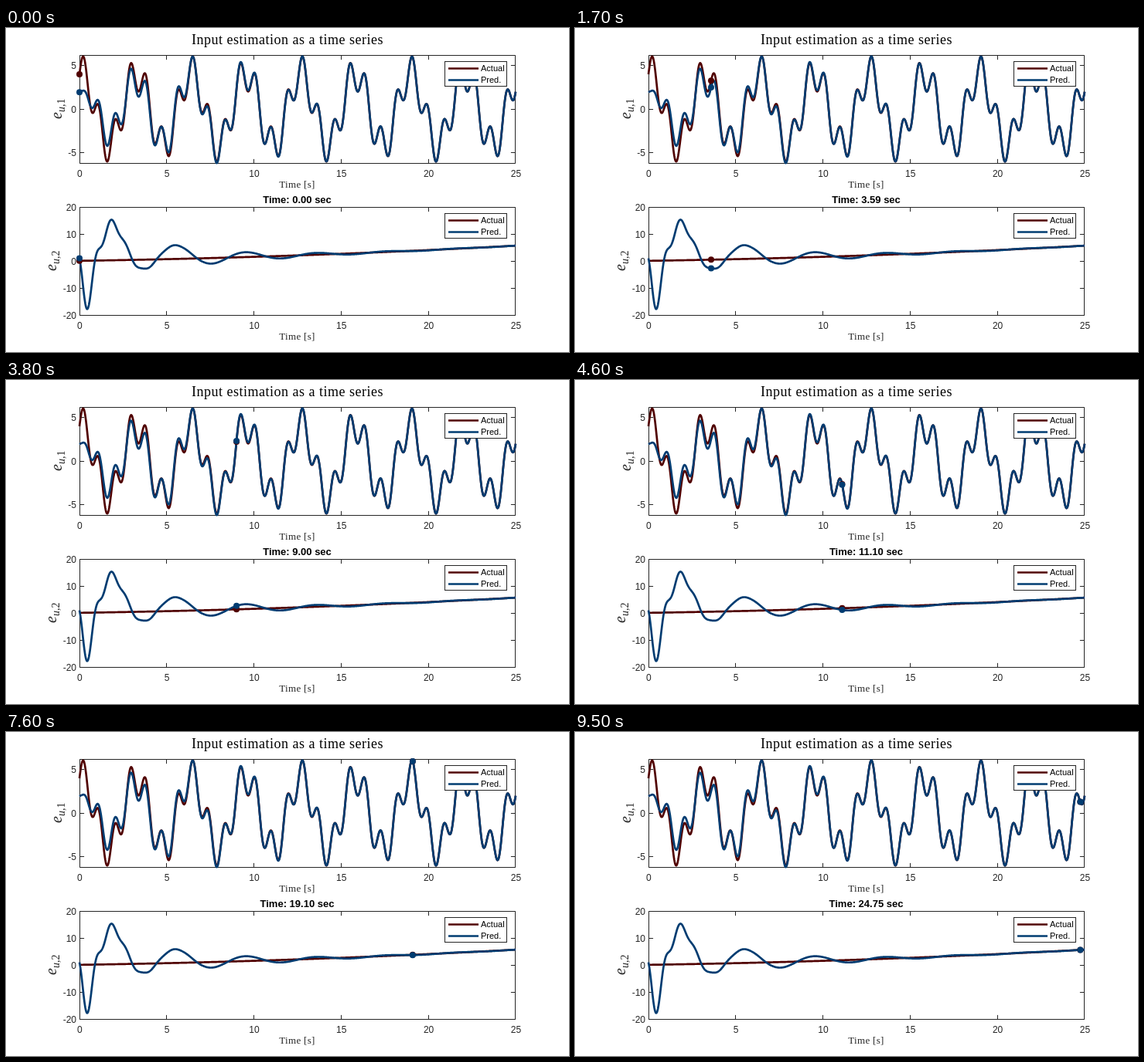
An HTML page that plays this animation: 728 by 420 pixels, repeating every 9.6 s.

```html
<!DOCTYPE html>
<html lang="en">
<head>
<meta charset="utf-8">
<title>Input estimation</title>
<style>
  html, body { margin: 0; width: 100%; height: 100%; overflow: hidden; background: #fff; }
  svg { display: block; width: 728px; height: 420px; }
  text { font: 12px "Liberation Sans", Arial, sans-serif; fill: #262626; }
  .serif { font: 13px "Liberation Serif", Times, serif; letter-spacing: .3px; }
  .head { font-size: 18px; letter-spacing: .5px; fill: #000; }
  .math { font: italic 20px "Liberation Serif", Times, serif; }
  .sub { font-size: 14px; }
  .num { font-style: normal; }
  .clock { font-size: 13px; font-weight: bold; fill: #000; }
  .key { font-size: 11px; fill: #000; }
  .mid { text-anchor: middle; }
  .end { text-anchor: end; }
  .frame { fill: none; stroke: #262626; stroke-width: 1; }
  .curve { fill: none; stroke-width: 2.7; stroke-linejoin: round; }
</style>
</head>
<body>
<svg id="stage" viewBox="0 0 728 420"></svg>
<script>
const stage = document.getElementById('stage');
const ACTUAL = '#500000', PRED = '#003c71';
const LEFT = 95, RIGHT = 659, SPAN = 25;
const STEP = 100, LOOP = 9600;
const { sin, cos, exp } = Math;

function add(tag, attrs, text) {
  const el = document.createElementNS('http://www.w3.org/2000/svg', tag);
  for (const k in attrs) el.setAttribute(k, attrs[k]);
  if (text !== undefined) el.textContent = text;
  stage.appendChild(el);
  return el;
}

const label = (x, y, cls, text) => add('text', { x, y, class: cls }, text);
const px = t => LEFT + t * (RIGHT - LEFT) / SPAN;
const snap = v => Math.floor(v) + .5;

const wave = t => 4 * cos(2 * t) + sin(2 * t) + 2 * sin(7 * t);
const drift = t => .2 + .097 * t + .0051 * t * t;

// Estimation errors: damped swing, start-up transient and ripple
const waveError = t =>
  2.3 * exp(-.3 * t) * cos(1.6 * (t - 5.6))
  - 11.5 * t * exp(-8 * t * t)
  - .8 * exp(-.45 * t) * sin(7 * t);

const driftError = t =>
  14.5 * exp(-.23 * t) * cos(1.56 * (t - 5.6))
  + 11 * exp(-.42 * t)
  - 40 * exp(-t) * sin(1.6 * (t + .1))
  - 8 * exp(-.9 * t) * cos(7 * (t - .5));

// The solver's steps grow slowly: [loop step, simulated seconds]
const clockKeys = [
  [0, 0], [10, 1.81], [17, 3.59], [30, 6.9], [46, 11.1], [60, 14.79], [76, 19.1], [95, 24.75]
];

function simTime(step) {
  const i = Math.max(1, clockKeys.findIndex(k => k[0] >= step));
  const [a, u] = clockKeys[i - 1], [b, v] = clockKeys[i];
  return u + (v - u) * (step - a) / (b - a);
}

const plots = [
  { top: 35.5, bottom: 175.5, zero: 105.2, unit: 11.3, ticks: [5, 0, -5],
    name: '1', nameAt: [72, 118], timeY: 207, legend: 43.5,
    actual: wave, pred: t => wave(t) + waveError(t) },
  { top: 232.5, bottom: 372.5, zero: 302.5, unit: 3.5, ticks: [20, 10, 0, -10, -20],
    name: '2', nameAt: [65, 315], timeY: 404, legend: 240.5,
    actual: drift, pred: t => drift(t) + driftError(t) }
];

function drawAxes(p) {
  const { top, bottom } = p, left = LEFT + .5, right = RIGHT - .5;
  let d = `M${left} ${top}H${right}V${bottom}H${left}Z`;
  for (let t = 0; t <= SPAN; t += 5) {
    const x = Math.min(snap(px(t)), right);
    d += `M${x} ${top}v5.6M${x} ${bottom}v-5.6`;
    label(px(t) + .4, bottom + 17.5, 'mid', t);
  }
  for (const v of p.ticks) {
    const y = snap(p.y(v));
    d += `M${left} ${y}h5.6M${right} ${y}h-5.6`;
    label(91, y + 4.5, 'end', v);
  }
  add('path', { d, class: 'frame' });
  label(376.5, p.timeY, 'serif mid', 'Time [s]');
  const [x, y] = p.nameAt;
  const name = add('text', { class: 'math', transform: `translate(${x} ${y}) rotate(-90)` });
  name.innerHTML = `e<tspan class="sub" dy="3.5">u,</tspan><tspan class="sub num">${p.name}</tspan>`;
}

function drawCurve(p, fn, stroke) {
  let d = '';
  for (let i = 0; i <= 1250; i++) {
    const t = i / 50;
    d += `${i ? 'L' : 'M'}${px(t).toFixed(2)} ${p.y(fn(t)).toFixed(2)}`;
  }
  add('path', { d, stroke, class: 'curve' });
}

function drawLegend(y) {
  add('rect', { x: 567.5, y, width: 80, height: 32, class: 'frame', style: 'fill:#fff' });
  [['Actual', ACTUAL], ['Pred.', PRED]].forEach(([text, stroke], i) => {
    const row = y + 9 + i * 15;
    add('path', { d: `M572 ${row}H611`, stroke, class: 'curve' });
    label(614, row + 3.7, 'key', text);
  });
}

label(364, 21, 'serif head mid', 'Input estimation as a time series');
const clock = label(376.5, 227, 'clock mid', '');
const dots = [];

for (const p of plots) {
  p.y = v => p.zero - v * p.unit;
  const series = [[p.actual, ACTUAL], [p.pred, PRED]];
  drawAxes(p);
  for (const [fn, color] of series) drawCurve(p, fn, color);
  for (const [fn, fill] of series) {
    dots.push({ el: add('circle', { r: 4, fill }), y: t => p.y(fn(t)) });
  }
  drawLegend(p.legend);
}

let start;
function tick(now) {
  start ??= now;
  const t = simTime(Math.floor((now - start) % LOOP / STEP));
  clock.textContent = `Time: ${t.toFixed(2)} sec`;
  for (const dot of dots) {
    dot.el.setAttribute('cx', px(t));
    dot.el.setAttribute('cy', dot.y(t));
  }
  requestAnimationFrame(tick);
}
requestAnimationFrame(tick);
</script>
</body>
</html>
```
